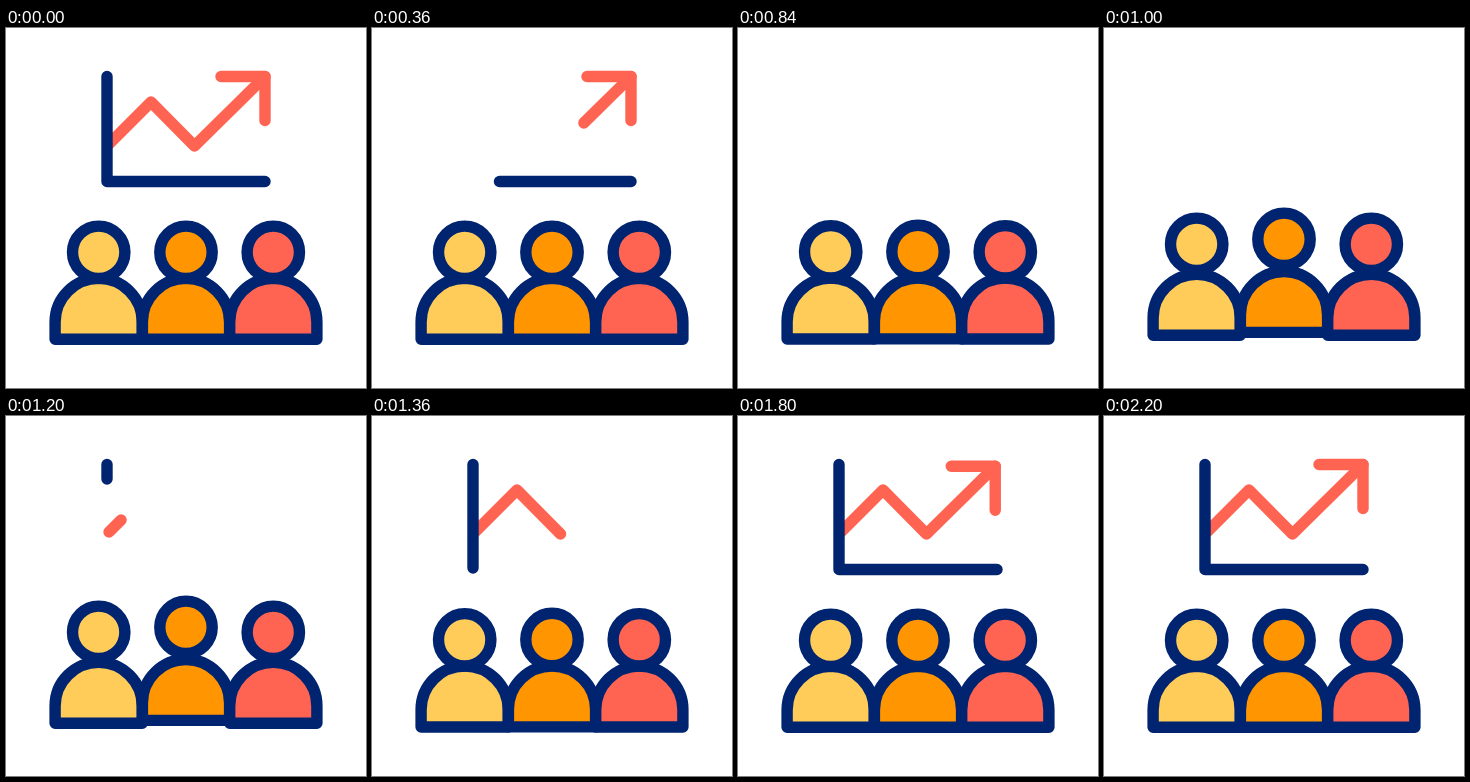
Recreate the animation shown at these times as an HTML page with a canvas. Size 360 by 360 pixels, loop 2560 ms.

```html
<!DOCTYPE html>
<html>
<head>
<meta charset="utf-8">
<style>
  html, body { margin: 0; height: 100%; overflow: hidden; background: #fff; }
  canvas { display: block; }
</style>
</head>
<body>
<canvas id="stage" width="360" height="360"></canvas>
<script>
const ctx = document.getElementById('stage').getContext('2d');
const LOOP = 2560, NAVY = '#012470', CORAL = '#ff6352';
const people = [
  { x: 92.7, fill: '#ffcc5a', head: 10.8, body: 5.5 },
  { x: 180, fill: '#ff9500', head: 17.5, body: 9.3 },
  { x: 267.3, fill: CORAL, head: 10.8, body: 5.5 }
];
const axis = [[101, 48.5], [101, 153.5], [259, 153.5]];

const clamp = (v, lo, hi) => Math.min(hi, Math.max(lo, v));

// Eased progress from 0 to 1 between two times
function ease(t, start, end) {
  const u = clamp((t - start) / (end - start), 0, 1);
  return u * u * (3 - 2 * u);
}

// Out and back again: 0 -> 1 -> 0
function bump(t, start, end) {
  const mid = (start + end) / 2;
  return ease(t, start, mid) - ease(t, mid, end);
}

function lengthOf(points) {
  let sum = 0;
  for (let i = 1; i < points.length; i++)
    sum += Math.hypot(points[i][0] - points[i - 1][0], points[i][1] - points[i - 1][1]);
  return sum;
}

// Strokes the part from..to (fractions) of several lines laid end to end
function strokeTrimmed(lines, color, from, to) {
  const total = lines.reduce((sum, line) => sum + lengthOf(line), 0);
  let offset = 0;
  ctx.strokeStyle = color;
  for (const line of lines) {
    const length = lengthOf(line);
    const a = clamp(from * total - offset, 0, length);
    const b = clamp(to * total - offset, 0, length);
    offset += length;
    if (b - a < 0.01) continue;
    ctx.setLineDash([b - a + (b === length ? 1 : 0), 999]);
    ctx.lineDashOffset = -a;
    ctx.beginPath();
    line.forEach(p => ctx.lineTo(...p));
    ctx.stroke();
  }
  ctx.setLineDash([]);
}

function drawChart(t) {
  const redraw = t > 1000;
  const from = redraw ? 0 : ease(t, 80, 640);
  const to = redraw ? ease(t, 1120, 1680) : 1;
  const pull = 4 * bump(t, 1680, 2200);
  const x = 259 - pull, y = 48.5 + pull;
  const trend = [[103, 116], [145, 74], [188.5, 118], [x, y]];
  const tip = [[x - 44, y], [x, y], [x, y + 44]];
  strokeTrimmed([trend, tip], CORAL, from, to);
  strokeTrimmed([axis], NAVY, from, to);
}

function drawPerson({ x, fill, head, body }, lift) {
  const r = 43.6, base = 311.3 - body * lift;
  ctx.fillStyle = fill;
  ctx.strokeStyle = NAVY;
  ctx.beginPath();
  ctx.moveTo(x - r, base);
  ctx.arc(x, base - 17.3, r, Math.PI, 0);
  ctx.lineTo(x + r, base);
  ctx.closePath();
  ctx.fill();
  ctx.stroke();
  ctx.beginPath();
  ctx.arc(x, 224.3 - head * lift, 26.2, 0, 2 * Math.PI);
  ctx.fill();
  ctx.stroke();
}

function draw(now) {
  const t = now % LOOP;
  ctx.fillStyle = '#fff';
  ctx.fillRect(0, 0, 360, 360);
  ctx.lineWidth = 11.4;
  ctx.lineCap = ctx.lineJoin = 'round';
  drawChart(t);
  const lift = bump(t, 800, 1400);
  people.forEach(person => drawPerson(person, lift));
}

let start;
function frame(now) {
  start ??= now;
  draw(now - start);
  requestAnimationFrame(frame);
}
requestAnimationFrame(frame);
</script>
</body>
</html>
```
